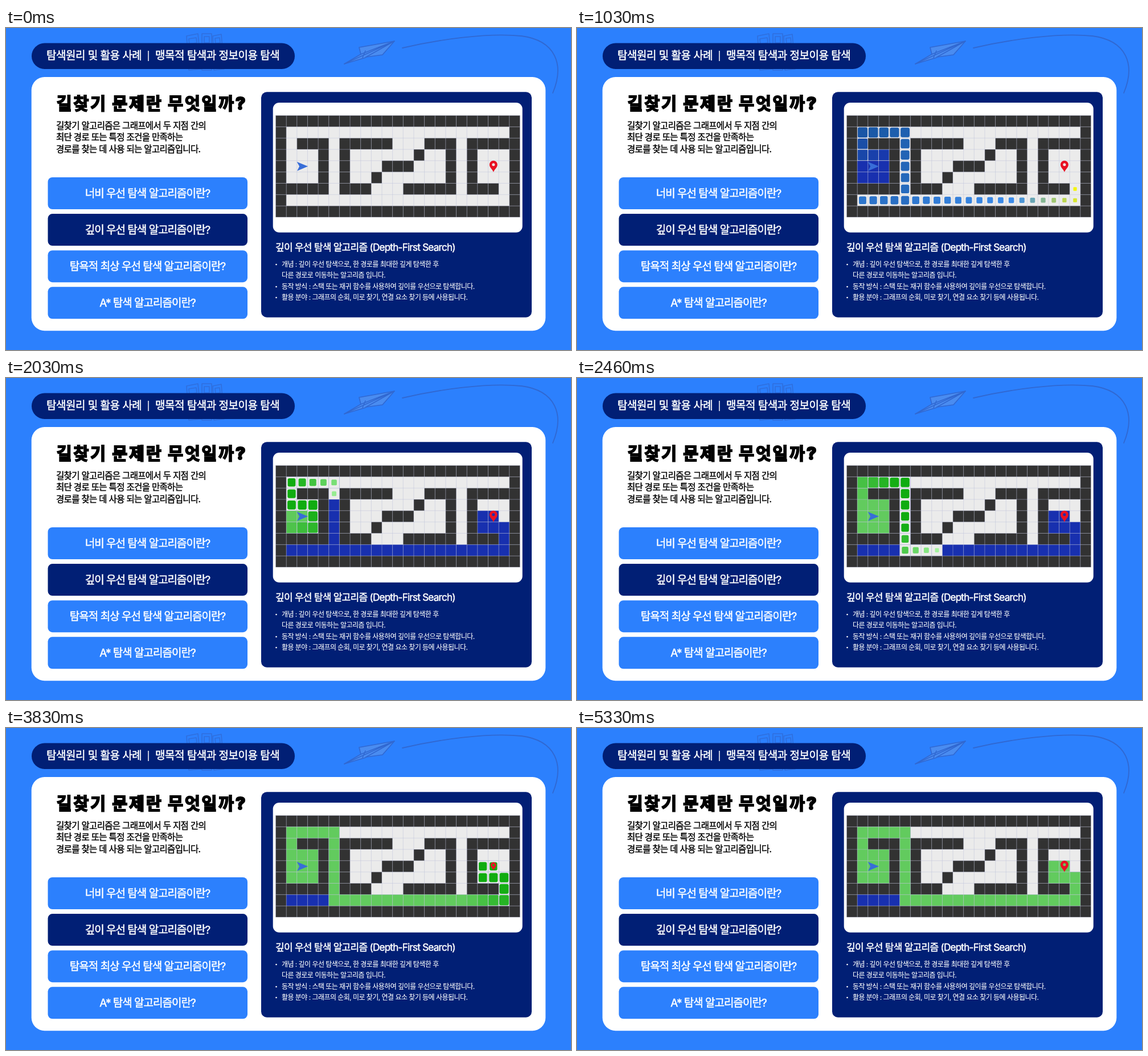
Recreate the animation shown at these times as an HTML page with a canvas. Size 992x565 px, loop 5760 ms.

```html
<!DOCTYPE html>
<html lang="ko">
<head>
<meta charset="utf-8">
<style>
  html, body { margin: 0; width: 100%; height: 100%; overflow: hidden; background: #2c80fd; }
  svg, canvas { position: absolute; left: 0; top: 0; }
  text { font-family: Inter, "Noto Sans CJK KR", "Noto Sans CJK", "Noto Sans CJK JP", sans-serif; fill: #fff; stroke: #fff; stroke-width: .5px; }
  .pill { font-size: 19px; letter-spacing: -.5px; }
  .title { font-size: 29.5px; font-weight: 900; letter-spacing: 2.6px; fill: #000; stroke: #000; stroke-width: 1.8px; }
  .lede { font-size: 15.5px; letter-spacing: -.67px; fill: #000; stroke: #000; stroke-width: .4px; }
  .button { font-size: 19px; letter-spacing: -1px; text-anchor: middle; }
  .head { font-size: 17px; letter-spacing: -.72px; }
  .note { font-size: 12px; letter-spacing: -.54px; stroke-width: .1px; }
  .sketch { fill: none; stroke: #3068d2; stroke-width: 1.6; stroke-linejoin: round; stroke-linecap: round; }
</style>
</head>
<body>
<svg width="992" height="565" viewBox="0 0 992 565">
  <rect width="992" height="565" fill="#2c80fd"/>
  <g class="sketch">
    <path opacity=".75" d="M317 14l20-4 6 62-22 2zM321 19l13-2 1 9-13 2zM344 10h17v64h-17zM348 15h9v11h-9zM363 14l15-3 5 61-18 2zM367 18l8-1 1 9-8 1z"/>
    <path d="M682 23L620 34l3 12-29 17 37-11 1-1 29-4z" fill="#4a8cf0"/>
    <path d="M682 23L623 46M682 23L632 51M682 23L594 63M631 40l-5 12"/>
    <path d="M696 35C760 20 845 8 905 14C965 22 981 64 960 114" stroke-width="1.8"/>
  </g>
  <rect x="45" y="26.500" width="462" height="45.500" rx="22.750" fill="#011f75"/>
  <text class="pill" x="71" y="55">탐색원리 및 활용 사례</text>
  <path d="M250 40v18" stroke="#fff" stroke-width="1.5"/>
  <text class="pill" x="262" y="55">맹목적 탐색과 정보이용 탐색</text>

  <rect x="44.700" y="86" width="902.600" height="445.300" rx="23" fill="#fff"/>
  <text class="title" x="88.500" y="142.500">길찾기 문제란 무엇일까?</text>
  <text class="lede" x="88" y="177">길찾기 알고리즘은 그래프에서 두 지점 간의</text>
  <text class="lede" x="88" y="197">최단 경로 또는 특정 조건을 만족하는</text>
  <text class="lede" x="88" y="217.500">경로를 찾는 데 사용 되는 알고리즘입니다.</text>
  <g id="buttons"></g>

  <rect x="448" y="112.300" width="475" height="395.500" rx="10" fill="#011f75"/>
  <rect x="468.700" y="131" width="438" height="227.800" rx="11" fill="#fff"/>
  <text class="head" x="473" y="391">깊이 우선 탐색 알고리즘 (Depth-First Search)</text>
  <text class="note" x="484" y="418.500">개념 : 깊이 우선 탐색으로, 한 경로를 최대한 깊게 탐색한 후</text>
  <text class="note" x="484" y="438">다른 경로로 이동하는 알고리즘 입니다.</text>
  <text class="note" x="484" y="457.500">동작 방식 : 스택 또는 재귀 함수를 사용하여 깊이를 우선으로 탐색합니다.</text>
  <text class="note" x="484" y="476.500">활용 분야 : 그래프의 순회, 미로 찾기, 연결 요소 찾기 등에 사용됩니다.</text>
  <g fill="#fff">
    <circle cx="474.500" cy="415" r="1.300"/>
    <circle cx="474.500" cy="454" r="1.300"/>
    <circle cx="474.500" cy="473" r="1.300"/>
  </g>
</svg>
<canvas id="maze" width="992" height="565"></canvas>
<script>
const LOOP = 5760;
const labels = ['너비 우선 탐색 알고리즘이란?', '깊이 우선 탐색 알고리즘이란?',
  '탐욕적 최상 우선 탐색 알고리즘이란?', 'A* 탐색 알고리즘이란?'];
document.getElementById('buttons').innerHTML = labels.map((label, i) => {
  const y = 262 + 64.1 * i;
  return `<rect x="73.500" y="${y}" width="350.500" height="56" rx="8" fill="${i === 1 ? '#011f75' : '#2c80fd'}"/>
    <text class="button" x="248.500" y="${y + 34.5}">${label}</text>`;
}).join('');

const maze = [
  '#######################',
  '#.....................#',
  '#.###.#####...###.#####',
  '#...#.#......#..#.#...#',
  '#...#.#...###...#.#...#',
  '#...#.#..#......#.#...#',
  '#####.###...#####.###.#',
  '#.....................#',
  '#######################'];
const COLS = 23, ROWS = 9, LEFT = 473.5, TOP = 153.5, W = 18.65, H = 19.83;
const start = [2, 4], goal = [20, 4];
const same = (a, b) => a[0] === b[0] && a[1] === b[1];

// Depth-first search: left, down, right, up
const visited = [], seen = new Set();
let path = [];
function search(cell, trail) {
  const [x, y] = cell, key = x + ',' + y;
  if (maze[y][x] === '#' || seen.has(key)) return false;
  seen.add(key);
  visited.push(cell);
  trail = [...trail, cell];
  if (same(cell, goal)) {
    path = trail;
    return true;
  }
  return [[-1, 0], [0, 1], [1, 0], [0, -1]].some(([dx, dy]) => search([x + dx, y + dy], trail));
}
search(start, []);

// Keys are [age, ...values], joined by straight lines
function tween(keys, age) {
  const n = keys.findIndex(k => k[0] > age);
  if (n === 0) return keys[0].slice(1);
  if (n < 0) return keys[keys.length - 1].slice(1);
  const a = keys[n - 1], b = keys[n], f = (age - a[0]) / (b[0] - a[0]);
  return a.slice(1).map((v, i) => v + (b[i + 1] - v) * f);
}

const visitStyle = {
  begin: 48, step: 23.5,
  scale: [[0, .3], [80, .41], [205, .52], [390, .67], [510, .75], [650, .85], [760, .92], [880, 1]],
  color: [[10, 255, 252, 0], [175, 60, 140, 235], [740, 26, 88, 165], [870, 24, 48, 175]]
};
const pathStyle = {
  begin: 1135, step: 57,
  scale: [[0, .35], [54, .45], [111, .53], [168, .6], [282, .71], [400, .78], [567, .85], [640, .9], [740, .97], [820, 1]],
  color: [[0, 170, 246, 165], [310, 16, 172, 16], [570, 16, 172, 16], [850, 98, 203, 94]]
};

const ctx = document.getElementById('maze').getContext('2d');
const arrow = new Path2D('M-9.500 -8L10 0L-9 8L-5 0Z');
const pin = new Path2D('M0 10C-2 5 -7 2 -7 -3A7 7 0 0 1 7 -3C7 2 2 5 0 10ZM2.500 -3A2.500 2.500 0 1 0 -2.500 -3A2.500 2.500 0 1 0 2.500 -3Z');

function fillCell(x, y, color, s = 1) {
  const w = W * s, h = H * s;
  ctx.fillStyle = color;
  ctx.beginPath();
  ctx.roundRect(LEFT + (x + .5) * W - w / 2, TOP + (y + .5) * H - h / 2, w, h, w * Math.min(.2, (1 - s) * 1.5));
  ctx.fill();
}

function drawGrid() {
  ctx.strokeStyle = 'rgba(185,188,215,.45)';
  ctx.lineWidth = 1;
  ctx.beginPath();
  for (let x = 0; x <= COLS; x++) {
    ctx.moveTo(LEFT + x * W, TOP);
    ctx.lineTo(LEFT + x * W, TOP + ROWS * H);
  }
  for (let y = 0; y <= ROWS; y++) {
    ctx.moveTo(LEFT, TOP + y * H);
    ctx.lineTo(LEFT + COLS * W, TOP + y * H);
  }
  ctx.stroke();
}

function drawIcon([x, y], shape, color, s) {
  ctx.save();
  ctx.translate(LEFT + (x + .5) * W, TOP + (y + .5) * H);
  ctx.scale(s, s);
  ctx.fillStyle = color;
  ctx.fill(shape, 'evenodd');
  ctx.restore();
}

function draw(t) {
  const scales = {};
  ctx.clearRect(0, 0, 992, 565);
  ctx.fillStyle = '#ebebeb';
  ctx.fillRect(LEFT, TOP, COLS * W, ROWS * H);
  ctx.fillStyle = '#323232';
  maze.forEach((row, y) => [...row].forEach((c, x) => {
    if (c === '#') ctx.fillRect(LEFT + x * W, TOP + y * H, W, H);
  }));

  const paint = (cells, style) => cells.forEach((cell, i) => {
    const age = t - style.begin - i * style.step;
    if (age < 0) return;
    const [s] = tween(style.scale, age);
    if (style === pathStyle) fillCell(...cell, '#ebebeb');
    fillCell(...cell, `rgb(${tween(style.color, age).map(Math.round)})`, s);
    scales[cell] = s;
  });
  paint(visited, visitStyle);
  paint(path, pathStyle);
  drawGrid();
  drawIcon(start, arrow, '#386dd8', scales[start] ?? 1);
  drawIcon(goal, pin, '#e81123', scales[goal] ?? 1);
}

function frame() {
  draw(performance.now() % LOOP);
  requestAnimationFrame(frame);
}
frame();
</script>
</body>
</html>
```
